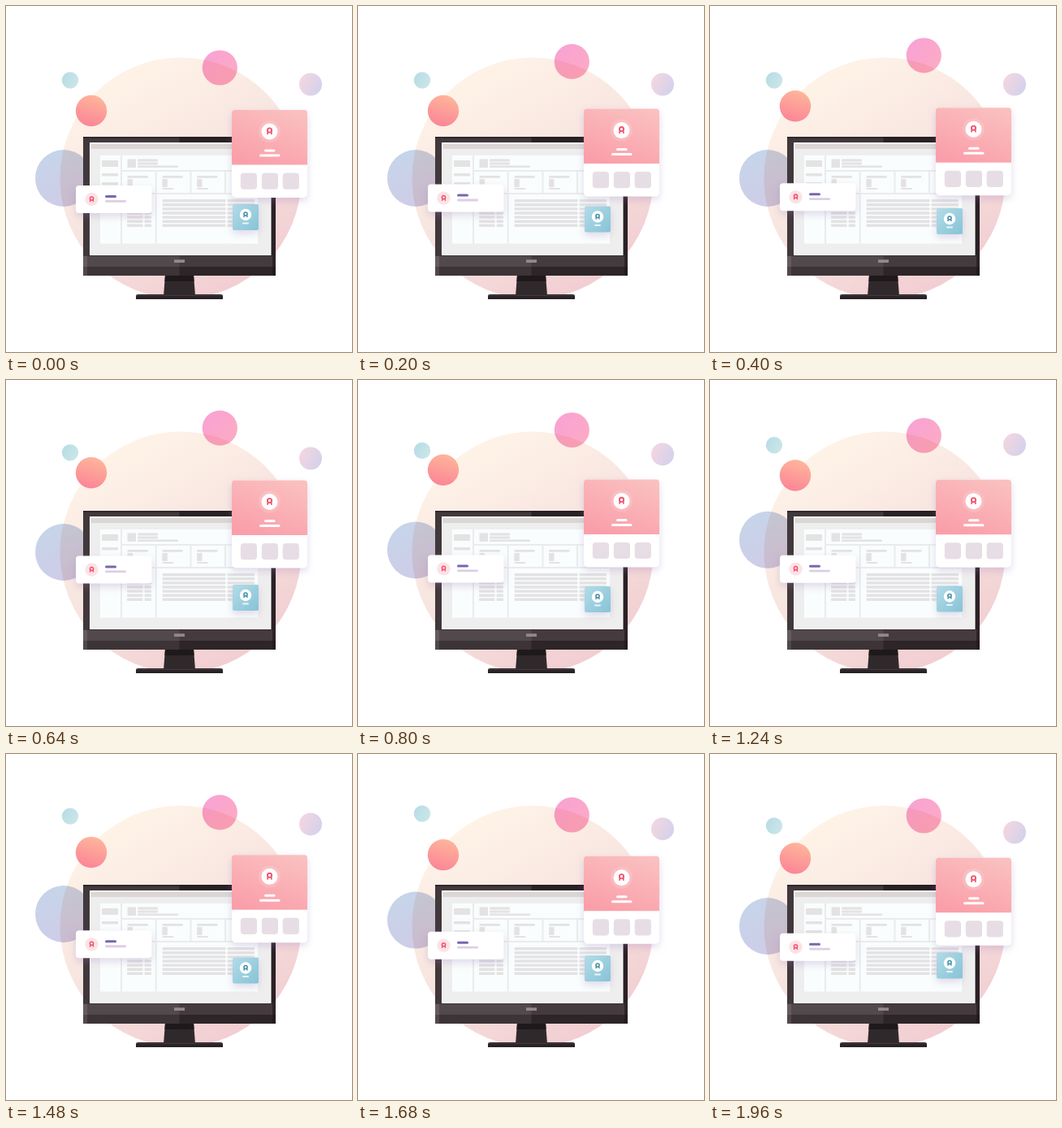
These frames come from a looping animation (426x426 px, 2 s). An HTML page:

```html
<!DOCTYPE html>
<html lang="en">
<head>
<meta charset="utf-8">
<title>Floating dashboard</title>
<style>
html, body { margin: 0; width: 100%; height: 100%; overflow: hidden; background: #fff; }
svg { display: block; width: 100vw; height: 100vh; }
.tint { mix-blend-mode: multiply; }
.pop { filter: drop-shadow(0 4px 5px rgba(150, 120, 185, .27)); }
</style>
</head>
<body>
<svg viewBox="0 0 426 426">
  <defs>
    <linearGradient id="back" x1=".2" y1=".05" x2=".75" y2="1">
      <stop stop-color="#fff4e8"/><stop offset=".5" stop-color="#f7e4e0"/><stop offset="1" stop-color="#f1cbd0"/>
    </linearGradient>
    <linearGradient id="pink" x1="0" y1="0" x2="1" y2=".8">
      <stop stop-color="#f8a1d6"/><stop offset="1" stop-color="#fcabc4"/>
    </linearGradient>
    <linearGradient id="coral" x1=".6" y1="0" x2=".3" y2="1">
      <stop stop-color="#ffb59b"/><stop offset="1" stop-color="#fb8496"/>
    </linearGradient>
    <linearGradient id="teal" x1="0" y1="0" x2="1" y2=".5">
      <stop stop-color="#b5dbe5"/><stop offset="1" stop-color="#c9e6e8"/>
    </linearGradient>
    <linearGradient id="lilac" x1="0" y1=".2" x2="1" y2=".7">
      <stop stop-color="#f5d6e0"/><stop offset="1" stop-color="#d3d1ec"/>
    </linearGradient>
    <linearGradient id="blue" x1=".2" y1="0" x2=".6" y2="1">
      <stop stop-color="#c5d5e9"/><stop offset="1" stop-color="#cfcce8"/>
    </linearGradient>
    <linearGradient id="rose" x1=".8" y1="0" x2=".3" y2="1">
      <stop stop-color="#fac0c0"/><stop offset="1" stop-color="#fa9fa9"/>
    </linearGradient>
    <linearGradient id="aqua" x1="0" y1="0" x2="1" y2="1">
      <stop stop-color="#b3dce8"/><stop offset="1" stop-color="#86c3d6"/>
    </linearGradient>
    <g id="medal">
      <path d="M-2 2 L-2.6 5.2 M2 2 L2.6 5.2" stroke-width="1.7"/>
      <circle r="2.6" fill="none" stroke-width="1.9"/>
    </g>
  </defs>

  <circle cx="215" cy="212" r="148.5" fill="url(#back)"/>
  <g class="tint">
    <circle id="ballBlue" cx="71" cy="212" r="35" fill="url(#blue)"/>
  </g>
  <g class="tint"><circle id="ballPink" cx="263.3" cy="76" r="21.6" fill="url(#pink)"/></g>
  <circle id="ballCoral" cx="105" cy="129" r="19.2" fill="url(#coral)"/>
  <circle id="ballTeal" cx="79" cy="91.5" r="10.2" fill="url(#teal)"/>
  <circle id="ballLilac" cx="375" cy="96.5" r="14" fill="url(#lilac)"/>

  <g id="monitor">
    <path d="M196 331H231L233 357H194Z" fill="#30292c"/>
    <path d="M196 331H231L231.6 339H195.4Z" fill="#1f191c"/>
    <path d="M160 361V357Q160 355 163 355H264Q267 355 267 357V361Z" fill="#2a2326"/>
    <path d="M161 356.3H266" stroke="#4a4145"/>
    <path d="M95 161H332V332H95Z" fill="#2a2125"/>
    <path d="M95 161H213.5V168H104V307H95Z" fill="#41383b"/>
    <path d="M95 161H332V163H95Z" fill="#231b1e" opacity=".55"/>
    <path d="M95 307.5H332V321H95Z" fill="#453b3f"/>
    <path d="M95 321H332V332H95Z" fill="#2d2528"/>
    <path d="M95 307.5H213.5V332H95Z" fill="#fff" opacity=".07"/>
    <path d="M95 307.5H100V332H95Z" fill="#fff" opacity=".1"/>
    <path d="M328 307.5H332V332H328Z" fill="#1d1518" opacity=".6"/>
    <path d="M207 312.3H220V316H207Z" fill="#93898c"/>
    <path d="M103 168H326.5V307H103Z" fill="#faf9f9"/>
    <path d="M104.500 170H325V305.500H104.500Z" fill="#efeeee"/>
    <path d="M104.500 170H325V176H104.500Z" fill="#dcd7d5"/>
    <path d="M116 184H310V292.500H116Z" fill="#f9fdfd"/>
    <path d="M142 184V292.500M184.700 203V292.500M227.500 203V231M270 203V231M142 203H310M142 231H310" stroke="#ecebec" stroke-width="2"/>
    <g id="page" fill="#e4e2e3"></g>
  </g>

  <g id="aquaCard" class="pop">
    <rect x="279" y="244" width="32" height="32" rx="2" fill="url(#aqua)"/>
    <circle cx="295" cy="257" r="7.2" fill="#fff"/>
    <use href="#medal" transform="translate(295 256) scale(.8)" stroke="#3f8eaa"/>
    <rect x="291" y="266.500" width="8" height="2" rx="1" fill="#e6f5f8"/>
  </g>
  <g id="note" class="pop">
    <rect x="86" y="221" width="93.500" height="34" rx="4" fill="#fff"/>
    <circle cx="105.500" cy="238" r="8.2" fill="#fce3e5"/>
    <use href="#medal" transform="translate(105.500 237) scale(.8)" stroke="#f0506f"/>
    <rect x="122" y="233" width="14" height="3" rx="1.500" fill="#7767b0"/>
    <rect x="122" y="239" width="26" height="2.800" rx="1.400" fill="#dccfe3"/>
  </g>
  <g id="card" class="pop">
    <rect x="278" y="128" width="93" height="108" rx="5" fill="#fff"/>
    <path d="M278 195.500V132Q278 128 282 128H367Q371 128 371 132V195.500Z" fill="url(#rose)"/>
    <circle cx="324.500" cy="154.500" r="13.500" fill="#fff" opacity=".14"/>
    <circle cx="324.500" cy="154.500" r="10" fill="#fff"/>
    <use href="#medal" transform="translate(324.500 153)" stroke="#f2546d"/>
    <rect x="318" y="176.500" width="13.500" height="3" rx="1.500" fill="#fff"/>
    <rect x="312" y="182.500" width="25.500" height="3" rx="1.500" fill="#fff"/>
    <g fill="#e7dee5">
      <rect x="288.800" y="205.500" width="20.200" height="20.200" rx="4"/>
      <rect x="314.800" y="205.500" width="20.200" height="20.200" rx="4"/>
      <rect x="340.700" y="205.500" width="20.200" height="20.200" rx="4"/>
    </g>
  </g>
</svg>
<script>
const byId = id => document.getElementById(id);

// Placeholder blocks on the screen: x, y, width, height
const blocks = [
  [118, 190, 20, 8], [118, 206, 20, 3.5], [118, 217, 20, 3.5],
  [149.5, 188.5, 10.5, 10.5], [162, 188.5, 25, 3], [162, 192.5, 25, 3], [162, 196.5, 50, 2.5]
];
for (const x of [149.5, 192.3, 235]) {
  blocks.push([x, 209, 25.5, 2.8], [x, 213, 6.5, 10], [x, 224, 14, 2]);
}
for (let row = 0; row < 7; row++) {
  const y = 238 + row * 5.1;
  blocks.push([149, y, 19.5, 3.4], [170.5, y, 8.5, 3.4], [192.5, y, 78, 3.4], [272.5, y, 33.5, 3.4]);
}
byId("page").innerHTML = blocks.map(([x, y, w, h]) =>
  `<rect x="${x}" y="${y}" width="${w}" height="${h}" rx="1"/>`).join("");

// Each part: vertical shift, then when it leaves, peaks and returns (ms)
const LOOP = 2000, STEP = 40;
const moves = {
  ballPink: [-19, 0, 500, 1750],
  ballCoral: [-19, 250, 750, 2000],
  ballTeal: [-19, 500, 1750, 2000],
  ballLilac: [-19, 667, 1167, 1833],
  ballBlue: [-19, 708, 1375, 1875],
  card: [-7, 0, 1000, 2000],
  note: [-7, 0, 1000, 2000],
  aquaCard: [12.5, 0, 1000, 2000]
};
const parts = Object.entries(moves).map(([id, move]) => [byId(id), move]);

function draw(now) {
  const t = Math.floor(now % LOOP / STEP) * STEP;
  for (const [el, [shift, start, peak, end]] of parts) {
    const k = Math.max(0, Math.min((t - start) / (peak - start), (end - t) / (end - peak)));
    el.setAttribute("transform", `translate(0 ${(shift * k).toFixed(2)})`);
  }
  requestAnimationFrame(draw);
}
draw(performance.now());
</script>
</body>
</html>
```
